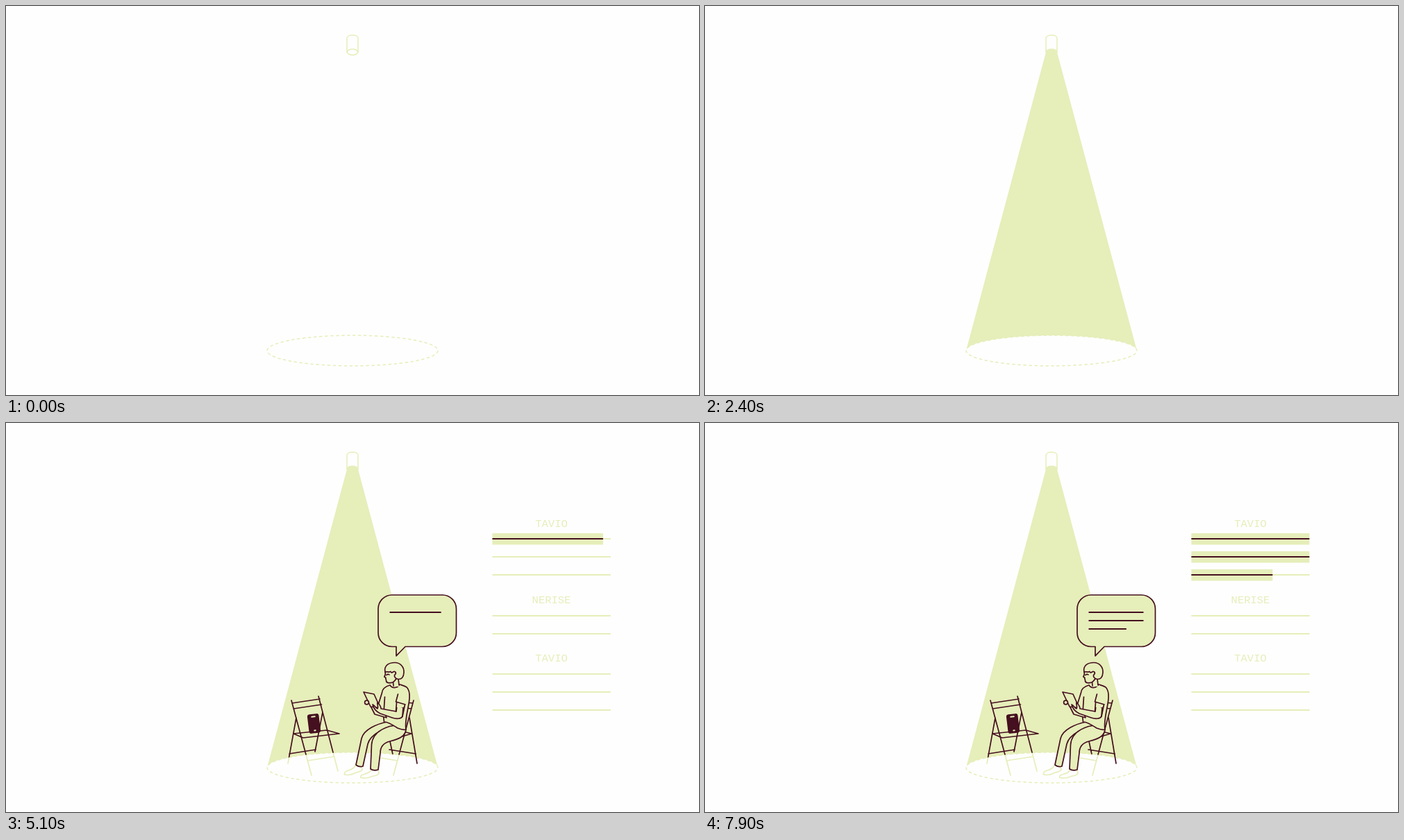
An HTML page that plays this animation: 998x561 px, repeating every 8 s.

```html
<!DOCTYPE html>
<html lang="en">
<head>
<meta charset="utf-8">
<title>Reading in the spotlight</title>
<style>
  html, body { margin: 0; width: 100%; height: 100%; overflow: hidden; background: #fefefe; }
  svg { display: block; width: 100vw; height: 100vh; --light: #e6eeba; --dark: #45101f; }
  path, ellipse, rect, circle { stroke-width: 1.7; stroke-linecap: round; stroke-linejoin: round; }
  .light { stroke: var(--light); fill: none; }
  .dark { stroke: var(--dark); fill: none; }
  .body { stroke: var(--dark); fill: var(--light); }
  .beam, .mark { fill: var(--light); }
  .script path { stroke-width: 1.8; stroke-linecap: butt; }
  text { fill: var(--light); font: 15.5px "Courier New", "Liberation Mono", monospace; text-anchor: middle; }
  #bubble path { vector-effect: non-scaling-stroke; }
</style>
</head>
<body>
<svg viewBox="0 0 998 561">
  <defs>
    <path id="cone" d="M491 66.5 L376 497 A123 22 0 0 1 622 497 L507 66.5 A8 4.2 0 0 0 491 66.5Z"/>
    <clipPath id="inBeam"><use href="#cone"/></clipPath>
    <g id="chairs">
      <path d="M411 400 L440 508 M450 394 L478 502 M418 425 L406 491 M456 417 L445 474
               M412 404 L452 398 M414.500 412 L454.500 406 M408 477 L446 471 M434 487 L473 481"/>
      <path d="M414 448 L462 443 L480 448 L428 454Z"/>
      <path d="M587 400 L558 508 M550 445 L557 478 M574 403 L586 404 M576 411 L583.500 412
               M552 471 L590 477 M540 483 L564 487 M551 458 L584 448 L576 446"/>
    </g>
  </defs>

  <ellipse id="ring" class="light" cx="499" cy="497" rx="123" ry="22" pathLength="512"
           stroke-dasharray="4.5 3.5" style="stroke-linecap:butt;stroke-width:1.5"/>
  <path class="light" style="stroke-width:1.5" d="M491 66.500 V46.500 C491 40.500 507 40.500 507 46.500 V66.500"/>
  <ellipse class="light" style="stroke-width:1.5" cx="499" cy="66.500" rx="7.700" ry="4.200"/>
  <g id="beam">
    <use href="#cone" class="beam"/>
    <ellipse class="beam" cx="499" cy="66.500" rx="8" ry="4.500"/>
  </g>

  <g id="scene">
    <use href="#chairs" class="light"/>
    <g clip-path="url(#inBeam)"><use href="#chairs" class="dark"/></g>
    <path class="dark" d="M581 425 L592 491"/>

    <g transform="rotate(-7 443.500 433.500)">
      <rect id="phone" class="dark" x="436" y="420.500" width="15" height="26" rx="2.500"/>
      <path id="phoneMarks" d="M441.500 423.500 H446 M443 443.500 H444.500" style="stroke-width:2"/>
    </g>

    <g id="shoes">
      <path d="M503 494 C501 498 497 500 493 501 C489 502 487 504 487.500 507 C493 508 499 507 502 505 C506 503 512 503 513 500 L512 495Z"/>
      <path d="M526 500 C524 504 520 505.500 516 506.500 C512 507.500 510 509 511 511.500 C517 512.500 522 512 526 510 C530 508.500 536 509 537 505 L536 500Z"/>
    </g>
    <path class="body" d="M549 431 C534 434 515 442 512 455 L504 493 C507 495.500 511 496 514 495 L521 463 C523 455 530 449 539 444 L570 441Z"/>
    <path class="body" d="M564 436 C552 436 528 443 526.500 464 L525 499 C528 501 533 501 536 500 L539 476 C539 465 545 461 553 459 C565 456 576 452 576 441Z"/>
    <path class="body" d="M553 378 C546 380 542 383 541.500 389 L534 413 L543 417 L544.500 431 C550 431 558 436 564 440 C569 442 573 443 576 442 C574 432 578 417 580 405 C582 394 581 385 577 381 C574 379 570 378 567 377 C563 383 556 383 553 378Z"/>
    <path class="dark" d="M545.500 395 L544 418"/>

    <g id="head">
      <path class="body" style="stroke:none" d="M557 371 L558 380 H566 L565 366Z"/>
      <path class="dark" d="M557.500 374 L558 379 M565 369 L566 378"/>
      <path class="body" d="M546 358 C547 361 546 364 544.800 366 L547 367.500 C546 369 548 370 547.500 372 C548 375 552 375.500 557 374 C560 372 562 370 563 366 L560 355Z"/>
      <path class="body" d="M546 359 C544 350 551 345.500 560 345.500 C568 345.500 573.500 352 573 360 C572.500 367 569 369.500 565 369.500 C561 369 559 366 559.500 363.500 C563 361 561 357 557.500 359 C556 360 555 361 554 358.500 C551 360 548 358 546 359Z"/>
      <path class="dark" d="M548 363.500 C549 362 551 362 552 363"/>
    </g>

    <g id="arm">
      <path class="body" d="M524 406 L531 420 L548 425 L544 414Z"/>
      <path class="body" d="M515 388 L530 391 L539 411 L525 409Z"/>
      <circle class="body" cx="519.500" cy="403" r="2.900"/>
      <path class="body" d="M572 410 L571 423 C569 427 562 427 556 425 L539 419 C533 416 529 411 528 406 C532 408 532 411 535 412 C537 409 534 406 535 403 C538 406 540 409 540 412 L562 416 L563 408Z"/>
    </g>
    <path class="body" style="stroke:none" d="M564 396 L562 410 H572 L576 403 L580 392Z"/>
    <path class="dark" d="M564.500 391 L561.500 402 L575 406 M562.500 403 L561.500 416 M574.500 406 L571 423"/>
  </g>

  <g id="bubble">
    <path class="body" d="M556 248 H628.500 A20 20 0 0 1 648.500 268 V302.500 A20 20 0 0 1 628.500 322.500 H575 L562 335.800 V322.500 H556 A20 20 0 0 1 536 302.500 V268 A20 20 0 0 1 556 248Z"/>
  </g>
  <g id="speech" class="script"></g>

  <g id="script" class="script">
    <text x="785.500" y="150">TAVIO</text>
    <text x="785.500" y="259.500">NERISE</text>
    <text x="785.500" y="343.500">TAVIO</text>
    <path class="light" d="M700.400 167h170.400m-170.400 26h170.400m-170.400 26h170.400
      M700.400 278h170.400m-170.400 26h170.400M700.400 362h170.400m-170.400 26h170.400m-170.400 26h170.400"/>
  </g>
</svg>
<script>
  const LOOP = 8000, LIGHT_ON = 2350, ENTER = 3000, CUE = 3500;
  const READ = 3600, LINE_TIME = 1600;
  const $ = id => document.getElementById(id);
  const set = (el, attrs) => { for (const k in attrs) el.setAttribute(k, attrs[k]); };
  const show = (el, on) => { el.style.display = on ? '' : 'none'; };
  const part = (t, from, to) => Math.min(1, Math.max(0, (t - from) / (to - from)));
  const ease = p => p * p * (3 - 2 * p);

  function add(parent, tag, cls) {
    const el = document.createElementNS('http://www.w3.org/2000/svg', tag);
    el.setAttribute('class', cls);
    parent.append(el);
    return el;
  }

  const lines = [0, 1, 2].map(i => ({
    start: READ + i * LINE_TIME,
    y: 167 + 26 * i,
    speechY: 273 + 12 * i,
    mark: add($('script'), 'rect', 'mark'),
    ink: add($('script'), 'path', 'dark'),
    speech: add($('speech'), 'path', 'dark')
  }));

  function drawLine(line, t) {
    const p = part(t, line.start, line.start + LINE_TIME);
    for (const el of [line.mark, line.ink, line.speech]) show(el, p > 0);
    set(line.mark, { x: 700.4, y: line.y - 8, width: 170 * p, height: 16.5 });
    set(line.ink, { d: `M700.4 ${line.y}h${170 * p}` });
    set(line.speech, { d: `M552.5 ${line.speechY}h${79 * p}` });
  }

  function draw(t) {
    set($('ring'), { 'stroke-dashoffset': -0.012 * Math.min(t, LIGHT_ON) });
    show($('beam'), t >= LIGHT_ON);
    show($('scene'), t >= ENTER);
    show($('script'), t >= CUE);

    const cued = t >= CUE;
    $('phone').style.fill = cued ? 'var(--dark)' : 'var(--light)';
    $('phoneMarks').style.stroke = cued ? 'var(--light)' : 'var(--dark)';
    $('shoes').style.fill = cued ? '#fefefe' : 'var(--dark)';
    $('shoes').style.stroke = 'var(--light)';

    const lift = ease(part(t, 3400, 3700));
    set($('arm'), { transform: `rotate(${-14.2 * (1 - lift)} 563 425)` });

    // The head nods while reading, tilting back once every 400 ms.
    const nod = t < READ ? -2 : -1 - Math.sin(t / 400 * 2 * Math.PI);
    set($('head'), { transform: `rotate(${t < READ ? nod : nod} 561 378)` });

    const size = part(t, 3200, 3560);
    show($('bubble'), size > 0);
    set($('bubble'), { transform: `translate(562 336) scale(${size}) translate(-562 -336)` });
    lines.forEach(line => drawLine(line, t));
  }

  function tick() {
    draw(performance.now() % LOOP);
    requestAnimationFrame(tick);
  }
  tick();
</script>
</body>
</html>
```
